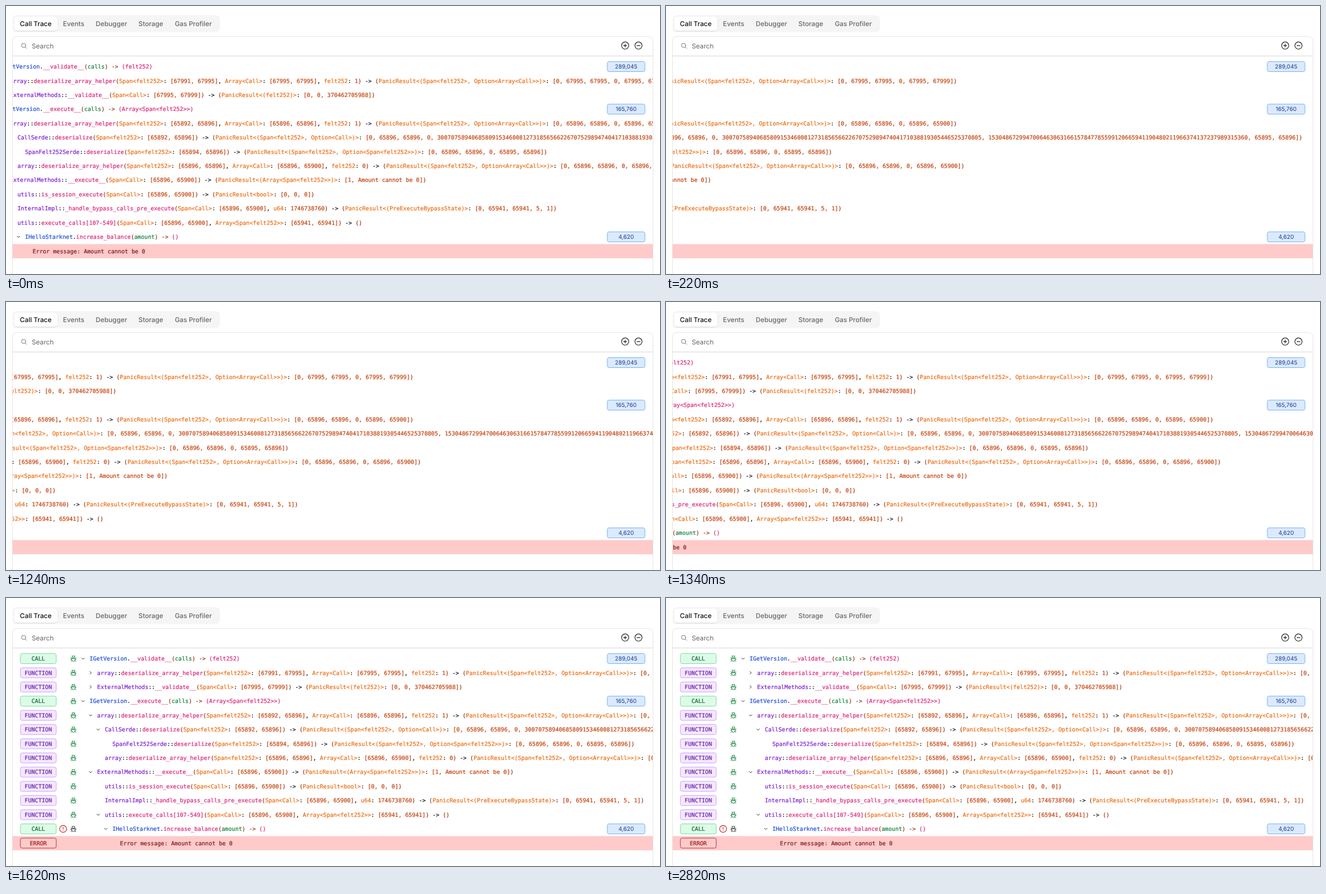
Write an HTML page that moves like this. It is 1168x480 px and loops after 2.88 s.

```html
<!DOCTYPE html>
<html lang="en">
<head>
<meta charset="utf-8">
<title>Call trace</title>
<style>
  html, body { margin: 0; width: 100%; height: 100%; overflow: hidden; background: #fff; }
  svg { display: block; }
  text { font: 500 11.84px Inter, sans-serif; fill: #666; white-space: pre; text-rendering: geometricPrecision; }
  .mono { font: 10.15px "DejaVu Sans Mono", monospace; }
  .mono, .mono tspan { fill: currentColor; stroke: currentColor; stroke-width: .22px; }
  .gas { font-size: 10.15px; font-weight: 400; fill: #1e3a8a; }
  .mid { text-anchor: middle; }
  .line { fill: none; stroke: currentColor; stroke-linecap: round; stroke-linejoin: round; }

  /* The scroll position changes once every 20 ms. */
  #track { animation: scroll 2880ms infinite; }
  @keyframes scroll {
    0%      { transform: translateX(-156px); animation-timing-function: steps(8); }
    5.5556% { transform: translateX(-706px); animation-timing-function: steps(3); }
    7.6389% { transform: translateX(-826px); animation-timing-function: steps(1); }
    39.5833% { transform: translateX(-818px); animation-timing-function: steps(3); }
    41.6667% { transform: translateX(-718px); animation-timing-function: steps(7); }
    46.5278% { transform: translateX(-368px); animation-timing-function: steps(4); }
    49.3056% { transform: translateX(-139.5px); animation-timing-function: steps(2); }
    50.6944% { transform: translateX(-55px); animation-timing-function: steps(3); }
    52.7778%, 100% { transform: translateX(0); }
  }
</style>
</head>
<body>
<svg width="1168" height="480" viewBox="0 0 1168 480">
  <defs>
    <clipPath id="view"><rect x="12" y="90" width="1143" height="390"/></clipPath>
    <filter id="soft" x="-10%" y="-20%" width="120%" height="150%">
      <feDropShadow dx="0" dy="1" stdDeviation="1" flood-opacity=".12"/>
    </filter>
    <g id="bug" class="line" stroke-width=".95">
      <path d="M-2.4-1.8V-2.4a2.4 2.4 0 0 1 4.8 0v.6zM-3-.2h6v2.2a3 3 0 0 1-6 0zM-2.6-5.1l1 1M2.6-5.1l-1 1"/>
      <path d="M-3 1.3H-5M3 1.3H5M-3-.2l-1.7-1.6M3-.2l1.7-1.6M-2.5 3.4l-2 1.6M2.5 3.4l2 1.6"/>
    </g>
  </defs>

  <rect x="12" y="16.5" width="370" height="30" rx="7" fill="#f5f5f5"/>
  <rect x="14.3" y="19" width="77.3" height="25" rx="5.5" fill="#fff" filter="url(#soft)"/>
  <g id="tabs"></g>

  <path d="M11.5 480V62.5a8 8 0 0 1 8-8h1128a8 8 0 0 1 8 8V480" fill="none" stroke="#e5e5e5"/>
  <path d="M12 89.5H1155" stroke="#e2e2e2" stroke-width="1.3"/>
  <g class="line" color="#737373"><circle cx="31.4" cy="70.6" r="3.7"/><path d="M34.2 73.4l2.6 2.6"/></g>
  <text x="46" y="75.6" style="font-weight:400">Search</text>
  <g class="line" color="#1c1c1c" stroke-width="1.15">
    <circle cx="1105.8" cy="70.8" r="6.4"/><path d="M1103 70.8h5.6M1105.8 68v5.6"/>
    <circle cx="1129.6" cy="70.8" r="6.4"/><path d="M1126.8 70.8h5.6"/>
  </g>

  <rect x="12" y="426.4" width="1143" height="25.4" fill="#fecaca"/>
  <g clip-path="url(#view)"><g id="track"></g></g>
  <g id="gas"></g>
</svg>

<script>
const ink = {
  blue: '#1d4ed8', purple: '#7e22ce', pink: '#db2777', green: '#15803d',
  type: '#ea6c12', value: '#c2410c', paren: '#9a3412', black: '#111', error: '#7f1d1d'
};
const badges = {
  CALL: ['#dcfce7', '#7bdc9f', '#166534'],
  FUNCTION: ['#f3e8ff', '#cfa0fb', '#6b21a8'],
  ERROR: ['none', '#b03a3a', '#991b1b']
};
const $ = id => document.getElementById(id);
const esc = s => s.replace(/</g, '&lt;').replace(/>/g, '&gt;');
const span = (color, s) => `<tspan color="${ink[color]}">${esc(s)}</tspan>`;

// Colours a list of "type: value" pairs.
const pairs = s => s.replace(/([\w<>(), ]+?): (\[.*?\]|\d+)(, )?/g, (_, type, value, comma) =>
  span('type', type) + span('black', ': ') + span('value', value) + (comma ? span('black', comma) : ''));
const parens = s => span('paren', '(') + s + span('paren', ')');

const call = (depth, owner, name, arg, result, gas, failed) => ({
  depth, gas, failed, kind: 'CALL', fold: 'down',
  text: span('blue', owner) + span('black', '.') + span('pink', name) + parens(span('green', arg)) +
    span('paren', ' -> ') + span('pink', `(${result})`)
});
const func = (depth, fold, owner, name, args, result) => ({
  depth, fold, kind: 'FUNCTION',
  text: span('purple', owner) + span('black', '::') + span('pink', name) + parens(pairs(args)) +
    span('black', ' -> ') + parens(pairs(result))
});

const optCalls = 'PanicResult<(Span<felt252>, Option<Array<Call>>)>: ';
const bigA = '3007075894068580915346008127318565662267075298947404171038819305446525370805';
const bigB = '1530486729947006463063166157847785599120665941190480211966374137237989315360';
const helper = 'deserialize_array_helper';
const session = 'Span<Call>: [65896, 65900]';

const rows = [
  call(0, 'IGetVersion', '__validate__', 'calls', 'felt252', '289,045'),
  func(1, 'right', 'array', helper, 'Span<felt252>: [67991, 67995], Array<Call>: [67995, 67995], felt252: 1',
    optCalls + '[0, 67995, 67995, 0, 67995, 67999]'),
  func(1, 'right', 'ExternalMethods', '__validate__', 'Span<Call>: [67995, 67999]',
    'PanicResult<(felt252)>: [0, 0, 370462705988]'),
  call(0, 'IGetVersion', '__execute__', 'calls', 'Array<Span<felt252>>', '165,760'),
  func(1, 'down', 'array', helper, 'Span<felt252>: [65892, 65896], Array<Call>: [65896, 65896], felt252: 1',
    optCalls + '[0, 65896, 65896, 0, 65896, 65900]'),
  func(2, 'down', 'CallSerde', 'deserialize', 'Span<felt252>: [65892, 65896]',
    `PanicResult<(Span<felt252>, Option<Call>)>: [0, 65896, 65896, 0, ${bigA}, ${bigB}, 65895, 65896]`),
  func(3, '', 'SpanFelt252Serde', 'deserialize', 'Span<felt252>: [65894, 65896]',
    'PanicResult<(Span<felt252>, Option<Span<felt252>>)>: [0, 65896, 65896, 0, 65895, 65896]'),
  func(2, '', 'array', helper, 'Span<felt252>: [65896, 65896], Array<Call>: [65896, 65900], felt252: 0',
    optCalls + '[0, 65896, 65896, 0, 65896, 65900]'),
  func(1, 'down', 'ExternalMethods', '__execute__', session,
    'PanicResult<(Array<Span<felt252>>)>: [1, Amount cannot be 0]'),
  func(2, '', 'utils', 'is_session_execute', session, 'PanicResult<bool>: [0, 0, 0]'),
  func(2, '', 'InternalImpl', '_handle_bypass_calls_pre_execute', session + ', u64: 1746738760',
    'PanicResult<(PreExecuteBypassState)>: [0, 65941, 65941, 5, 1]'),
  func(2, 'down', 'utils', 'execute_calls[107-549]', session + ', Array<Span<felt252>>: [65941, 65941]', ''),
  call(3, 'IHelloStarknet', 'increase_balance', 'amount', '', '4,620', true),
  { depth: 4, kind: 'ERROR', text: span('error', 'Error message: Amount cannot be 0') }
];

const box = (x, y, w, fill, stroke) =>
  `<rect x="${x}" y="${y - 9}" width="${w}" height="18" rx="3.2" fill="${fill}" stroke="${stroke}"/>`;
const chevron = (x, y, fold) =>
  `<path class="line" color="#222" transform="translate(${x} ${y}) rotate(${fold === 'right' ? -90 : 0})" d="M-2.3-1.1L0 1.2 2.3-1.1"/>`;
const alertIcon = y => `<g class="line" color="#b91c1c" stroke-width="1.1"><circle cx="102" cy="${y}" r="6.2"/>
  <path d="M102 ${y - 3}v3.4M102 ${y + 2.8}v.1"/></g>`;

function drawRow(row, i) {
  const y = 108.5 + i * 25.42;
  const shift = row.depth * 13.54;
  const [fill, stroke, color] = badges[row.kind];
  let out = box(25.7, y, 64, fill, stroke) +
    `<text class="mono mid" x="57.7" y="${y + 3.6}" color="${color}">${row.kind}</text>`;
  if (row.kind !== 'ERROR')
    out += `<use href="#bug" x="120.4" y="${y}" color="${row.failed ? '#333' : '#15803d'}"/>`;
  if (row.failed) out += alertIcon(y);
  if (row.fold) out += chevron(137.6 + shift, y, row.fold);
  out += `<text class="mono" x="${149.3 + shift}" y="${y + 3.6}">${row.text}</text>`;
  if (row.gas)
    $('gas').innerHTML += box(1073.9, y, 67.2, '#dbeafe', '#74b1f9') +
      `<text class="gas mid" x="1107.5" y="${y + 3.7}">${row.gas}</text>`;
  return out;
}

$('track').innerHTML = rows.map(drawRow).join('');
$('tabs').innerHTML = [['Call Trace', 24.8], ['Events', 101.8], ['Debugger', 160.2], ['Storage', 236.6], ['Gas Profiler', 301.4]]
  .map(([name, x], i) => `<text x="${x}" y="35.9"${i ? '' : ' style="fill:#111"'}>${name}</text>`).join('');
</script>
</body>
</html>
```
